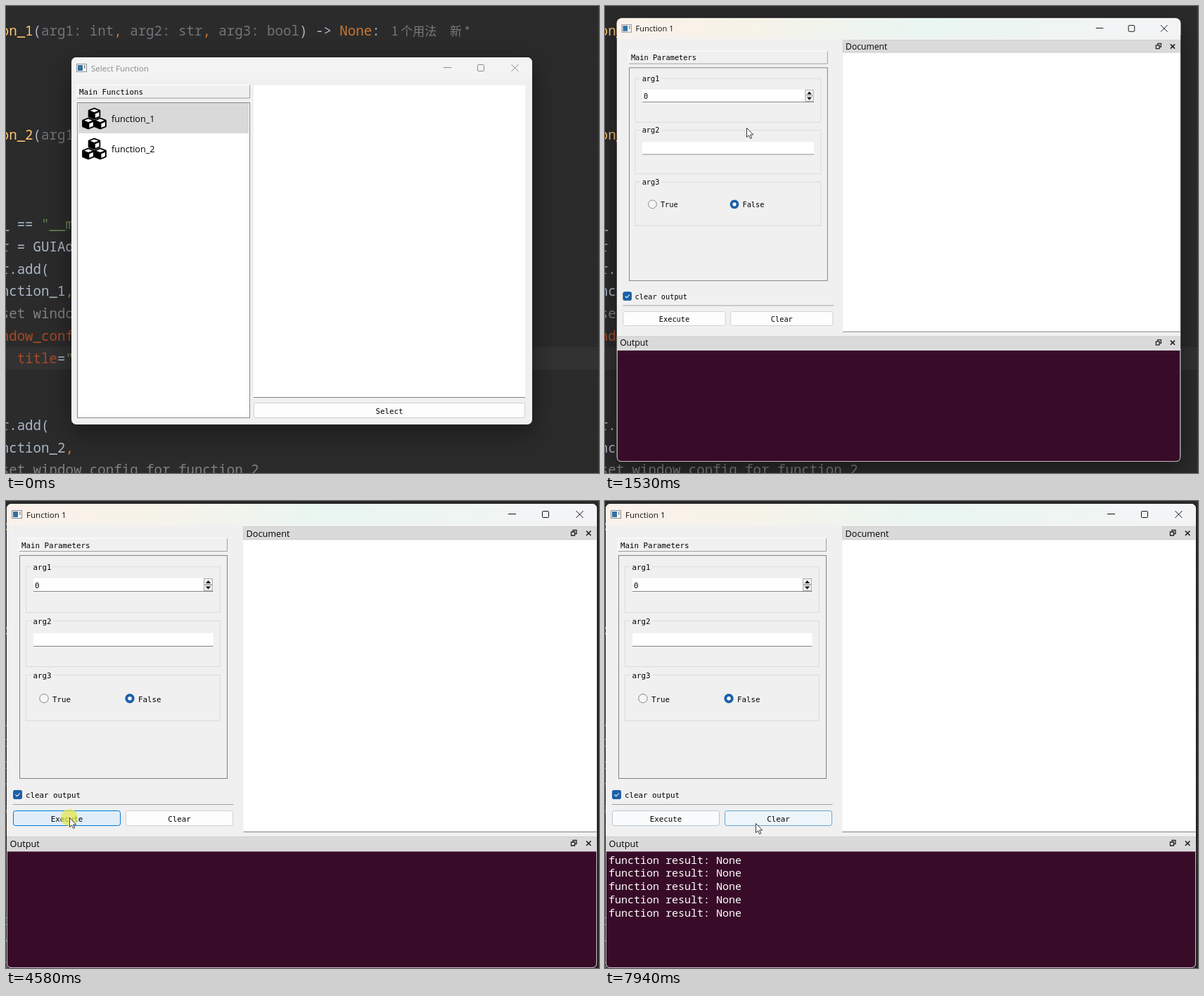
Animation, 843 px wide and 664 px high, one loop 8000 ms. Source, as an HTML page:

```html
<!DOCTYPE html>
<html lang="en">
<head>
<meta charset="utf-8">
<title>Function runner</title>
<style>
  html, body { margin: 0; width: 100%; height: 100%; overflow: hidden; background: #2b2b2b; }
  svg { display: block; }
  text { white-space: pre; }
  .code { font: 19.12px "Noto Sans Mono", monospace; }
  .hint { font: 17px "Noto Sans CJK SC", "Noto Sans CJK", sans-serif; }
  .form { font: 10.8px "DejaVu Sans Mono", monospace; }
  .title { font: 11.6px "Open Sans", sans-serif; }
  .label { font: 12.7px "Open Sans", sans-serif; }
  .console { font: 15px "Noto Sans Mono", monospace; fill: #fff; }
  .shadow { filter: drop-shadow(0 12px 18px rgba(0, 0, 0, .42)); }
  #dialog { --ink: #8a8a8a; --row: #d9d9d9; --edge: #d9d9d9; --tint: 0; }
  #dialog.active { --ink: #111; --row: #cce8ff; --edge: #16242f; --tint: 1; }
  #runner { --ink: #111; --tint: 1; }
  .ink { fill: var(--ink); }
  .pen { stroke: var(--ink); fill: none; }
  .tint { opacity: var(--tint); }
  .row { fill: var(--row); stroke: var(--edge); }
</style>
</head>
<body>
<svg id="stage" width="843" height="664" viewBox="0 0 843 664">
  <defs>
    <linearGradient id="mica">
      <stop offset="0" stop-color="#fbf1ea"/>
      <stop offset=".25" stop-color="#f6f3e9"/>
      <stop offset=".55" stop-color="#e9f6f1"/>
      <stop offset="1" stop-color="#f4f4f6"/>
    </linearGradient>
  </defs>
</svg>
<script>
const DURATION = 8000;
const stage = document.getElementById('stage');

// Drawing helpers
const rect = (x, y, w, h, fill, extra = '') =>
  `<rect x="${x}" y="${y}" width="${w}" height="${h}" fill="${fill}" ${extra}/>`;
const path = (d, stroke, extra = '') => `<path d="${d}" fill="none" stroke="${stroke}" ${extra}/>`;
const text = (kind, x, y, words, extra = '') =>
  `<text class="${kind}" x="${x}" y="${y}" ${extra}>${words}</text>`;

const colors = { y: '#ffc66d', w: '#a9b7c6', g: '#72737a', o: '#cc7832', s: '#6a8759', c: '#808080', k: '#aa4926' };
const code = (middle, parts, x = -7.3) => text('code', x, middle + 6.7,
  parts.map(([c, words]) => `<tspan fill="${colors[c]}">${words}</tspan>`).join(''));

function editor() {
  const comment = [['c', 'set window config for function 2']];
  return rect(0, 0, 843, 664, '#2b2b2b') + rect(0, 485, 843, 32, '#323232')
    + path('M842.5 0V664', '#3d3d3d', 'stroke-dasharray="3 2"')
    + code(35.5, [['y', 'on_1'], ['w', '('], ['g', 'arg1: int'], ['o', ', '], ['g', 'arg2: str'], ['o', ', '],
      ['g', 'arg3: bool'], ['w', ') -&gt; '], ['o', 'None'], ['w', ':']])
    + text('hint', 548, 42, '1 个用法', 'fill="#787878"') + text('hint', 631, 42, '新 *', 'fill="#787878"')
    + code(183, [['y', 'on_2'], ['w', '('], ['g', 'arg1: int']])
    + code(310, [['w', '_ == '], ['s', '"__main__"']])
    + code(342, [['w', 'r = GUIAdapter()']])
    + code(374, [['w', 'r.add(']])
    + code(405, [['w', 'nction_1'], ['o', ',']])
    + code(437, comment)
    + code(469, [['k', 'ndow_config']])
    + code(501, [['k', 'title'], ['w', '='], ['s', '"']], 15.7)
    + code(596, [['w', 'r.add(']])
    + code(628, [['w', 'nction_2'], ['o', ',']])
    + code(659, comment);
}

// Window frame with title bar, icon and caption buttons
function frame(x, y, w, h, title) {
  const cy = y + 15, right = x + w;
  return rect(x, y, w, h, '#f0f0f0', 'rx="7" class="shadow"')
    + rect(x, y, w, 31, '#f3f3f3', 'rx="7"')
    + rect(x, y, w, 31, 'url(#mica)', 'rx="7" class="tint"')
    + rect(x, y + 24, w, 8, '#f0f0f0', 'opacity=".35"')
    + rect(x + 7.5, cy - 5.5, 14, 11, '#fafafa', 'stroke="#8a8f94"')
    + rect(x + 9, cy - 4, 7, 8, '#33709f') + rect(x + 18, cy - 4, 1.5, 5, '#8a8f94')
    + text('title ink', x + 28, cy + 4.5, title)
    + `<g class="pen"><path d="M${right - 126} ${cy - .5}h11"/>
      <rect x="${right - 77.5}" y="${cy - 4.5}" width="9" height="9" rx="1"/>
      <path d="M${right - 29.5} ${cy - 5}l10 10m0 -10l-10 10"/></g>`;
}

const heading = (x, y, w, words) => path(`M${x} ${y + 18.5}V${y}H${x + w}`, '#fff')
  + path(`M${x} ${y + 18.5}H${x + w}V${y}`, '#a0a0a0') + text('form', x + 3, y + 13.5, words);

const button = (id, x, y, w, words) => rect(x, y, w, 21, '#fdfdfd', 'rx="3" stroke="#d0d0d0"')
  + rect(x, y, w, 21, '#e0eef9', `id="${id}" rx="3" stroke="#0078d4" opacity="0"`)
  + text('form', x + w / 2, y + 15, words, 'text-anchor="middle"');

const cube = (x, y) => `<g transform="translate(${x} ${y})">
  <path d="M0 -8L8.300 -4.700V4.700L0 8L-8.300 4.700V-4.700Z" stroke="#000" stroke-linejoin="round"/>
  <path d="M0 -6.600L5.800 -4.300L0 -1.900L-5.800 -4.300ZM1.400 .3L6.900 -2V3.700L1.400 6Z" fill="#fff"/></g>`;

const listItem = (y, words) => cube(125.5, y - 7) + cube(117, y + 7) + cube(134, y + 7)
  + text('label', 150, y + 4.5, words, 'style="font-size:12.6px"');

function dialog() {
  return frame(93, 73, 655, 522, 'Select Function')
    + heading(101, 112.5, 245.5, 'Main Functions')
    + rect(101.5, 137.5, 245, 448, '#fff', 'stroke="#828790"')
    + `<rect class="row" x="103.5" y="138.5" width="241" height="42"/>`
    + listItem(160, 'function_1') + listItem(203, 'function_2')
    + rect(352, 113, 386, 444, '#fff') + path('M352 556.500H738', '#808080')
    + button('select', 352.5, 564.5, 385, 'Select');
}

const group = (y, words) => rect(28.5, y, 276, 65, 'none', 'stroke="#dcdcdc"')
  + rect(36, y - 3, 31, 6, '#f0f0f0') + text('form', 38.5, y + 4, words);
const field = (y) => rect(39, y, 255.5, 19, '#fff') + path(`M39 ${y + 18.5}H294.5`, '#868686');
const radio = (x, words, on) => `<circle cx="${x}" cy="280.7" r="${on ? 4.7 : 6.2}" fill="${on ? '#fff' : '#f6f6f6'}"
  stroke="${on ? '#1c61a8' : '#868686'}" stroke-width="${on ? 4 : 1}"/>` + text('form', x + 12, 285.5, words);

const dock = (x, y, words) => rect(x, y, 839 - x, 18, '#dadada', 'stroke="#cfcfcf"')
  + text('label', x + 4, y + 14, words)
  + path(`M806 ${y + 7}v-2h5v5h-2M803.5 ${y + 7.5}h5v5h-5z`, '#222', 'stroke-width="1.3"')
  + path(`M825 ${y + 6}l6.5 6.5m0 -6.5l-6.5 6.5`, '#222', 'stroke-width="1.7"');

function runner() {
  const lines = [0, 1, 2, 3, 4].map(i =>
    text('console line', 5, 515.5 + i * 18.9, 'function result: None')).join('');
  return frame(1, 4, 839, 660, 'Function 1')
    + heading(19, 53, 295.5, 'Main Parameters')
    + rect(19.5, 77.5, 295, 317, 'none', 'stroke="#828282"')
    + group(93.5, 'arg1') + field(110) + text('form', 41, 123.5, '0')
    + rect(281.5, 110.5, 12, 8, '#f0f0f0', 'stroke="#adadad"') + rect(281.5, 119.5, 12, 8, '#f0f0f0', 'stroke="#adadad"')
    + '<path d="M284 117l3.5 -4l3.5 4zM284 121.500h7l-3.500 4z"/>'
    + group(170.5, 'arg2') + field(188)
    + group(247.5, 'arg3') + radio(54, 'True', false) + radio(176, 'False', true)
    + rect(10.5, 411.5, 12, 12, '#f6f6f6', 'rx="2.5" stroke="#868686"')
    + '<g id="checked">' + rect(10, 411, 13, 13, '#1c5fa6', 'rx="3"')
    + rect(10, 411, 13, 13, '#0f67c0', 'id="checkHover" rx="3" opacity="0"')
    + path('M13.500 417.500l2.300 2.300l4 -4.300', '#fff', 'stroke-width="1.1"') + '</g>'
    + text('form', 28, 422, 'clear output')
    + path('M10 431.500H323.500', '#a0a0a0')
    + button('execute', 10.5, 440.5, 152, 'Execute') + button('clear', 170.5, 440.5, 152, 'Clear')
    + dock(337.5, 36.5, 'Document') + rect(337.5, 56, 502, 414.5, '#fff') + path('M337.500 470.500H839.500', '#808080')
    + dock(1.5, 477.5, 'Output') + rect(1, 496, 839, 2, '#e4e4e4')
    + '<path d="M1.500 498H839.500V657q0 6.500 -6.500 6.500H8q-6.500 0 -6.500 -6.500Z" fill="#380c28" stroke="#c8c0c6"/>'
    + lines;
}

stage.innerHTML += editor()
  + `<g id="dialog">${dialog()}</g><g id="runner">${runner()}</g>`
  + `<circle id="halo" r="12" fill="#e3e64a" opacity=".72"/>
     <path id="cursor" d="M.5 .5V13.600L3.500 10.900L5.700 15.500L7.700 14.600L5.600 10H9.700Z"
       fill="#fff" stroke="#222" stroke-width=".9" stroke-linejoin="round"/>`;

const $ = id => document.getElementById(id);
const outputLines = [...document.querySelectorAll('.line')];

// [time, x, y]
const route = [
  [270, 430, 668], [1040, 201, 173], [1660, 201, 173], [1880, 160, 116], [1950, 125, 69],
  [2230, 81, 31], [2370, 81, 31], [2440, 71, 25], [2830, 71, 25], [3460, 208, 430],
  [3670, 212, 446], [3760, 212, 449], [4510, 90, 450], [5100, 90, 450], [5420, 178, 454],
  [5810, 72, 412], [5900, 72, 410], [6010, 72, 410], [6350, 90, 450], [7130, 90, 450],
  [7450, 70, 416], [7660, 70, 416], [7940, 214, 458]
];
// [time, scale, opacity]
const opening = [[1440, .88, 0], [1460, .9, .4], [1530, .9547, 1], [1600, .985, 1], [1690, 1, 1]];
const clicks = [[1180, 1260], [1330, 1460], [4580, 4760], [5900, 6040], [6480, 6560],
  [6680, 6760], [6860, 6940], [7050, 7130], [7500, 7600]];
const printed = [4720, 6540, 6740, 6920, 7110];
const unchecked = [5960, 7540];
const hoverAreas = {
  execute: [10, 440, 163, 462],
  clear: [170, 440, 323, 462],
  checkHover: [10, 409, 107, 427]
};

function at(table, t) {
  const next = table.findIndex(row => row[0] > t);
  if (next < 0) return table[table.length - 1].slice(1);
  if (next === 0) return table[0].slice(1);
  const a = table[next - 1], b = table[next], k = (t - a[0]) / (b[0] - a[0]);
  return a.slice(1).map((v, i) => v + (b[i + 1] - v) * k);
}

// Hover fades over 200 ms: the share of recent moments spent inside the area
function hoverLevel([left, top, right, bottom], t) {
  let inside = 0;
  for (let i = 0; i < 10; i++) {
    const [x, y] = at(route, t - i * 20);
    if (x >= left && x <= right && y >= top && y <= bottom) inside++;
  }
  return inside / 10;
}

const show = (node, on) => { node.style.display = on ? '' : 'none'; };

function render(t) {
  $('dialog').classList.toggle('active', t >= 70);
  $('dialog').style.opacity = Math.min(1, Math.max(0, (1500 - t) / 90));
  show($('dialog'), t < 1500);

  const [scale, opacity] = at(opening, t);
  show($('runner'), t >= 1440);
  $('runner').style.opacity = opacity;
  $('runner').setAttribute('transform',
    `translate(${354 * (1 - scale)} ${307 * (1 - scale)}) scale(${scale})`);

  outputLines.forEach((line, i) => show(line, t >= printed[i]));
  show($('checked'), t < unchecked[0] || t >= unchecked[1]);
  for (const id in hoverAreas) {
    $(id).setAttribute('opacity', t < 1700 ? 0 : hoverLevel(hoverAreas[id], t));
  }

  const place = `translate(${at(route, t).join(' ')})`;
  $('cursor').setAttribute('transform', place);
  $('halo').setAttribute('transform', place);
  show($('cursor'), t >= 270);
  show($('halo'), clicks.some(([from, to]) => t >= from && t < to));
}

function tick() {
  render(performance.now() % DURATION);
  requestAnimationFrame(tick);
}
tick();
</script>
</body>
</html>
```
